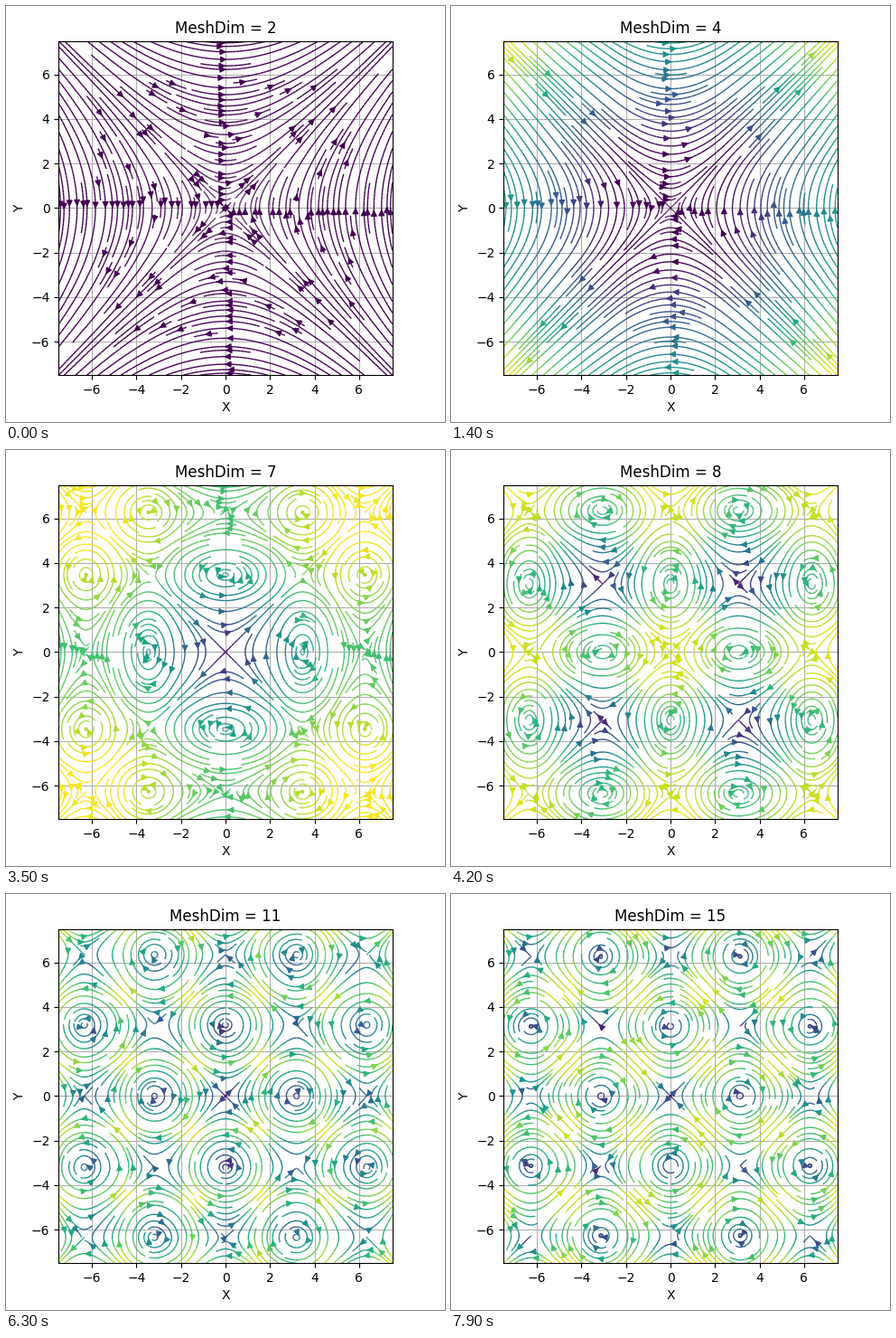
Recreate the animation shown at these times as a matplotlib script. Size 486 by 460 pixels, loop 8 s.

```python
import numpy as np
import matplotlib.pyplot as plt
from matplotlib.animation import FuncAnimation

WIDTH, HEIGHT, DPI = 486, 460, 100
HALF = 7.5                      # half width of the sampled square
SIDE = 369.6                    # axes side in pixels
LEFT, BOTTOM = 58.2, 51.8       # axes corner in pixels
MESH_DIMS = range(2, 16)

STEP_MS = 100
SLOW, FAST = 7, 3               # steps per mesh before and after the speed-up
SPEEDUP = 70                    # step at which the pace changes
STEPS = 80

# The tiny surplus keeps the pixel size from rounding down.
fig = plt.figure(figsize=((WIDTH + 1e-4) / DPI, (HEIGHT + 1e-4) / DPI), dpi=DPI)
ax = fig.add_axes([LEFT / WIDTH, BOTTOM / HEIGHT, SIDE / WIDTH, SIDE / HEIGHT])


def render_mesh(dim):
    """Draw the field sampled on a dim x dim mesh and return the picture."""
    axis = np.linspace(-HALF, HALF, dim)
    x, y = np.meshgrid(axis, axis)
    u, v = np.sin(y), np.sin(x)

    ax.clear()
    ax.set(xlim=(-HALF, HALF), ylim=(-HALF, HALF),
           xlabel="X", ylabel="Y", title=f"MeshDim = {dim}")
    ticks = range(-6, 7, 2)
    ax.set_xticks(ticks)
    ax.set_yticks(ticks)
    ax.grid(True)
    ax.streamplot(x, y, u, v, color=np.sqrt(u**2 + v**2), density=2,
                  linewidth=1, cmap="viridis")
    ax.set(xlim=(-HALF, HALF), ylim=(-HALF, HALF))

    fig.canvas.draw()
    return np.array(fig.canvas.buffer_rgba())


# Each mesh is rendered once, since stream lines are slow to redraw.
pages = [render_mesh(dim) for dim in MESH_DIMS]
ax.remove()
view = fig.figimage(pages[0])


def page_at(step):
    if step < SPEEDUP:
        return step // SLOW
    return SPEEDUP // SLOW + (step - SPEEDUP) // FAST


def update(step):
    view.set_data(pages[page_at(step)])
    return [view]


anim = FuncAnimation(fig, update, frames=STEPS, interval=STEP_MS,
                     init_func=lambda: update(0), repeat=True,
                     repeat_delay=0, blit=False)

plt.show()
```
